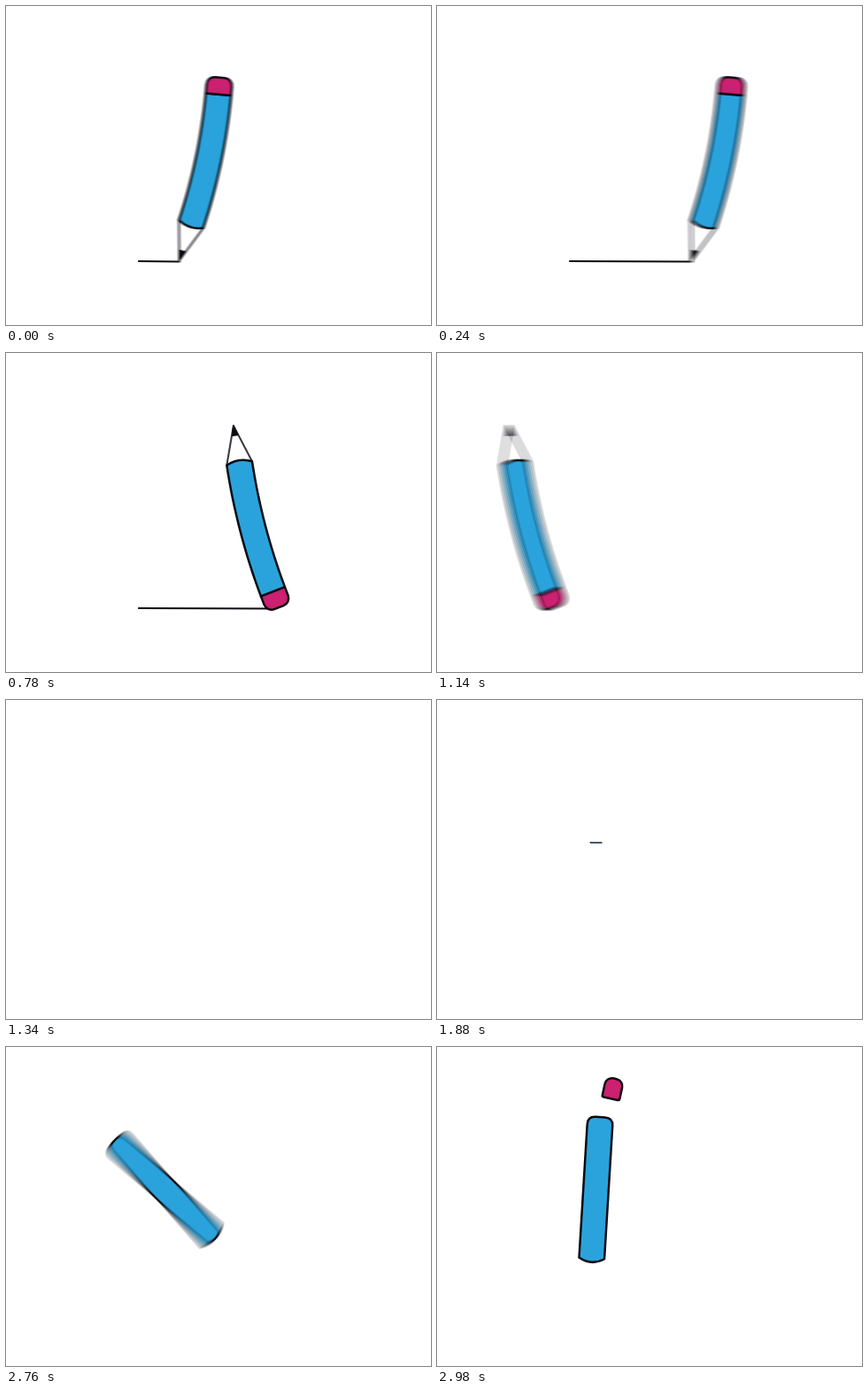
These frames come from a looping animation (480 px wide and 360 px high, 3 s). An HTML page with a canvas:

```html
<!DOCTYPE html>
<html lang="en">
<head>
<meta charset="utf-8">
<title>Pencil</title>
<style>
html, body { margin: 0; width: 100%; height: 100%; overflow: hidden; background: #fff; }
canvas { display: block; }
</style>
</head>
<body>
<canvas id="stage" width="480" height="360"></canvas>
<script>
const LOOP = 3000, STEP = 20, SHUTTER = 14, SAMPLES = 7;
const BLUE = '#2aa3dc', PINK = '#cc2070', INK = '#0c0c12';
const CONE = 43, BODY = 150, HALF = 14.5;
const LINE_START = 150, LINE_END = 305, LINE_Y = 288;

const out = document.getElementById('stage').getContext('2d');
const layer = document.createElement('canvas');
layer.width = 480;
layer.height = 360;
const c = layer.getContext('2d');
c.lineJoin = c.lineCap = 'round';

const rad = deg => deg * Math.PI / 180;
const mix = (a, b, u) => a + (b - a) * u;
const span = (t, a, b) => Math.min(1, Math.max(0, (t - a) / (b - a)));
const smooth = u => u * u * (3 - 2 * u);
const easeOut = u => 1 - (1 - u) ** 2;
// Draws back a little before moving, then settles
const windUp = u => u < .5 ? 2 * u * u * (7.2 * u - 2.6) : 1 - 2 * (1 - u) ** 2;
const bezier = (a, b, d, u) => mix(mix(a, b, u), mix(b, d, u), u);

// Piecewise linear track of [time, value] pairs
function track(t, keys) {
  const i = keys.findIndex(k => t < k[0]);
  if (i < 0) return keys[keys.length - 1][1];
  if (i === 0) return keys[0][1];
  const [a, va] = keys[i - 1], [b, vb] = keys[i];
  return mix(va, vb, span(t, a, b));
}

function paint(fill, stroke = INK, width = 2.5) {
  c.fillStyle = fill;
  c.strokeStyle = stroke;
  c.lineWidth = width;
  c.fill();
  c.stroke();
}

function at(x, y, deg, draw) {
  c.save();
  c.translate(x, y);
  c.rotate(rad(deg));
  c.beginPath();
  draw();
  c.restore();
}

// Angles run clockwise from up, along the pencil from its tip to its eraser
function pencil({ x, y, a0, a1 }) {
  at(x, y, a0, () => {
    c.moveTo(-HALF, -CONE);
    c.lineTo(0, 0);
    c.lineTo(HALF, -CONE);
    paint('#fff', '#3a3843', 2);
    c.beginPath();
    c.moveTo(0, 0);
    c.lineTo(-3, -11);
    c.lineTo(3, -11);
    c.closePath();
    paint(INK, INK, 1.5);
  });

  const N = 16, left = [], right = [];
  const sin0 = Math.sin(rad(a0)), cos0 = Math.cos(rad(a0));
  let px = x + CONE * sin0, py = y - CONE * cos0;
  const neck = [px - 7 * sin0, py + 7 * cos0];
  for (let i = 0; i <= N; i++) {
    const a = rad(mix(a0, a1, i / N)), dx = HALF * Math.cos(a), dy = HALF * Math.sin(a);
    left.push([px - dx, py - dy]);
    right.push([px + dx, py + dy]);
    if (i < N) {
      px += BODY / N * Math.sin(a);
      py -= BODY / N * Math.cos(a);
    }
  }
  c.beginPath();
  c.moveTo(...left[0]);
  for (const p of [...left, ...right.reverse()]) c.lineTo(...p);
  c.quadraticCurveTo(...neck, ...left[0]);
  paint(BLUE);

  at(px, py, a1, () => {
    c.roundRect(-HALF, -19, 2 * HALF, 19, [9, 9, 0, 0]);
    paint(PINK);
  });
}

function pencilPose(t) {
  if (t < 280) return { x: 194 + .25 * t + .00052 * t * t, y: 287, a0: 18, a1: 5 };
  if (t < 560) {
    const u = smooth(span(t, 280, 515));
    return {
      x: bezier(LINE_END, 191, 313, u), y: bezier(287, 166, 61, u),
      a0: mix(18, 180, u), a1: mix(5, 180, u)
    };
  }
  const u = windUp(span(t, 560, 770));
  const d = Math.max(0, t - 780), k = Math.min(d, 300);
  return {
    x: mix(313, 257, u) - .00135 * k * k - .81 * (d - k), y: mix(61, 82, u),
    a0: mix(180, 171, u), a1: mix(180, 159, u)
  };
}

function writeAndErase(t) {
  const pose = pencilPose(t);
  const end = t < 280 ? pose.x : t < 780 ? LINE_END - 2 * span(t, 700, 780) : pose.x + 46;
  if (end > LINE_START) {
    c.beginPath();
    c.moveTo(LINE_START, LINE_Y);
    c.lineTo(end, LINE_Y + .5);
    c.strokeStyle = INK;
    c.lineWidth = 2.2;
    c.stroke();
  }
  pencil(pose);
}

function assemble(t) {
  const pop = easeOut(span(t, 2830, 2975));
  if (pop > 0) {
    at(mix(186, 198.5, pop), mix(88, 47.5, pop), 12, () => {
      c.scale(pop, pop);
      c.roundRect(-10, -12, 20, 23, [8, 8, 2, 2]);
      paint(PINK);
    });
  }

  const size = track(t, [[1880, .08], [2400, .235], [2565, .83], [2710, .95], [2860, 1]]);
  const turn = track(t, [[1880, 90], [2400, 120], [2565, 189], [2800, 335], [2870, 363.5]]);
  at(179.5, 161, turn, () => {
    const w = 14.3 * size * Math.min(1, size + .35), h = 82 * size, r = 9 * size;
    c.moveTo(-w, h - r / 2);
    c.lineTo(-w, r - h);
    c.quadraticCurveTo(-w, -h, r - w, -h);
    c.lineTo(w - r, -h);
    c.quadraticCurveTo(w, -h, w, r - h);
    c.lineTo(w, h - r / 2);
    c.quadraticCurveTo(0, h + r / 2, -w, h - r / 2);
    paint(BLUE, INK, Math.max(.6, 2.5 * size));
  });
}

function scene(t) {
  c.fillStyle = '#fff';
  c.fillRect(0, 0, 480, 360);
  if (t < 1340) writeAndErase(t);
  else if (t >= 1880) assemble(t);
}

function tick(now) {
  const t = Math.floor(now % LOOP / STEP) * STEP;
  // Average several moments for motion blur
  for (let i = 0; i < SAMPLES; i++) {
    scene(t + SHUTTER * i / (SAMPLES - 1));
    out.globalAlpha = 1 / (i + 1);
    out.drawImage(layer, 0, 0);
  }
  requestAnimationFrame(tick);
}

const start = performance.now();
requestAnimationFrame(function first() {
  tick(0);
});
function frame() {
  tickAt(performance.now() - start);
}
function tickAt(ms) {
  tick(ms);
}
</script>
</body>
</html>
```
